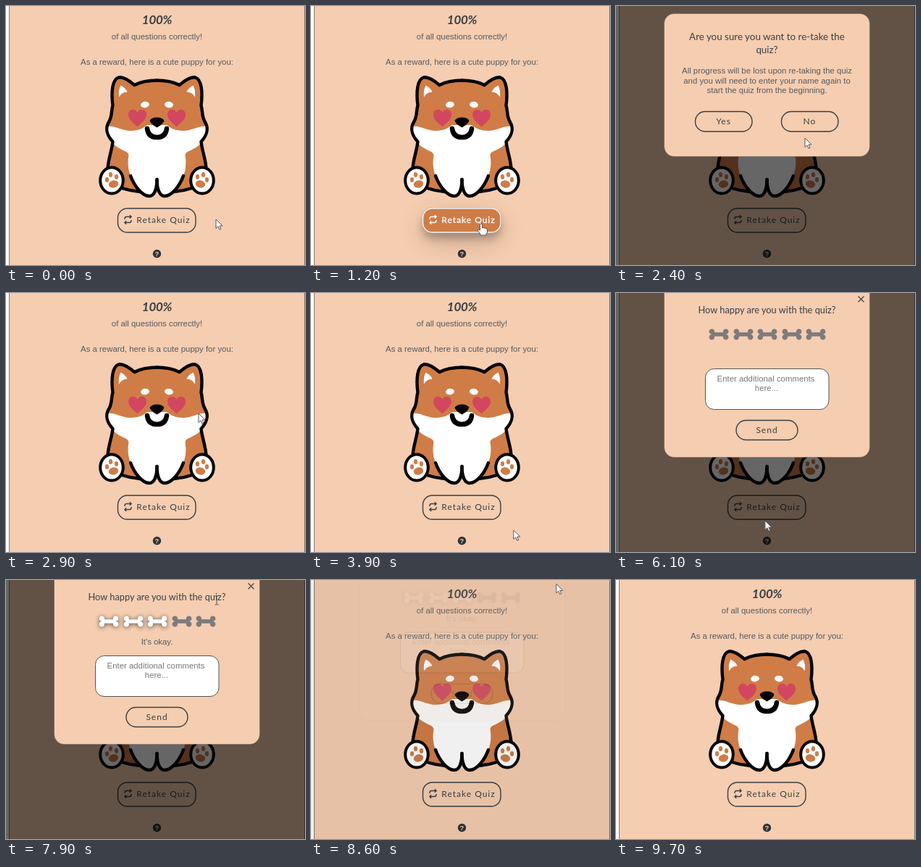
Animation, 413 px wide and 357 px high, one loop 9.8 s. Source, as an HTML page:

```html
<!DOCTYPE html>
<html lang="en">
<head>
<meta charset="utf-8">
<title>Quiz result</title>
<style>
html, body { margin: 0; width: 100%; height: 100%; overflow: hidden; background: #fff; }
svg { display: block; }
text { font: 11.4px "Liberation Sans", Arial, sans-serif; fill: #555b5f; text-anchor: middle; }
.hand { font-family: Lato, sans-serif; font-size: 13.4px; fill: #3a4043; }
.score { font-size: 17px; font-weight: 700; font-style: italic; letter-spacing: -.3px; }
.label { font-size: 12px; letter-spacing: 1px; }
.hint { fill: #777; }
.line { fill: none; stroke: #3a4043; stroke-width: 1.4; }
.hover .line { stroke: #fff; }
.hover .label { fill: #fff; stroke: #fff; stroke-width: .35px; }
.card { fill: #f5cdb0; stroke: rgba(0, 0, 0, .2); }
.ink { fill: none; stroke: #000; stroke-width: 4.4; stroke-linecap: round; stroke-linejoin: round; }
.fur { fill: #d07c46; }
.white { fill: #fff; }
.pointer { fill: #fff; stroke: #555; stroke-linejoin: round; }
</style>
</head>
<body>
<svg id="stage" width="413" height="357" viewBox="0 0 413 357">
  <defs>
    <path id="coat" class="fur" d="M209.5 102.5C196 102.5 186 104.500 177.500 109C168 101 160 97.500 155.500 98.500C147 101 145 118 147.500 137C145 145 147 152 142 160C137 168 139 178 147.500 187C146 200 141 212 140.500 224V240L160 251L185 257H209.5Z"/>
    <path id="belly" class="white" d="M140 166C150 164 160 172 172 172C184 172 190 168 195 164H210.500V250C208 258 203 262 198 262C188 262 177 248 172 234C168 224 168 214 169.500 206C169 199 160 201 147 189C142 182 139 174 140 166Z"/>
    <g id="details">
      <path class="ink" d="M209 102.5C196 102.5 186 104.500 177.500 109C168 101 160 97.500 155.500 98.500C147 101 145 118 147.500 137C145 145 147 152 142 160C137 168 139 178 147.500 187C146 200 141 212 140.500 224M160 251Q172 255 185 256"/>
      <path class="ink" d="M172 234C177 248 188 262 198 262C205 262 208.5 252 208.5 239"/>
      <path class="white" d="M158.500 109.500Q165 112.500 167.500 118.500Q160 118.500 156 125.500Q155 116 158.500 109.500Z"/>
      <ellipse class="white" cx="192" cy="136" rx="6" ry="4.2" transform="rotate(-8 192 136)"/>
      <path fill="#d2475f" d="M181.500 166.500C176 161 169 157 169 149.500C169 141.500 179 140.500 181.500 147C184 140.500 194 141.500 194 149.500C194 157 187 161 181.500 166.500Z"/>
      <ellipse cx="146" cy="240.500" rx="15.800" ry="18" fill="#fff" stroke="#000" stroke-width="4"/>
      <g class="fur">
        <ellipse cx="148.500" cy="245.500" rx="6.800" ry="5.200" transform="rotate(-12 148.500 245.500)"/>
        <ellipse cx="139.500" cy="239.500" rx="2.600" ry="3.400"/>
        <ellipse cx="144.500" cy="232.500" rx="2.600" ry="3.600"/>
        <ellipse cx="152.500" cy="235.500" rx="2.600" ry="3.400"/>
      </g>
    </g>
    <path id="bone" d="M-6 -2.800A3.800 3.800 0 1 0 -9.500 0A3.800 3.800 0 1 0 -6 2.800H6A3.800 3.800 0 1 0 9.500 0A3.800 3.800 0 1 0 6 -2.800Z"/>
    <path id="arrow" d="M164 294v-1q0-2.500 2.500-2.500h6.500m-2.200-2.300l2.300 2.300l-2.300 2.300"/>
  </defs>
  <rect class="white" width="413" height="357"/>
  <rect x="4.500" y="-1" width="408" height="360" fill="#f5cdb0" stroke="#85786f"/>
  <g id="page"></g>
  <rect id="shade" width="413" height="357"/>
  <g id="confirm"></g>
  <g id="feedback"></g>
  <g id="cursor">
    <path id="default" class="pointer" d="M0 0V12.500L3 9.800L5 14.300L7 13.400L5 9H9Z"/>
    <path id="press" class="pointer" d="M-1.500 1.200Q0 -.8 1.500 1.200V6Q3 4.800 4.200 6.200Q5.800 5.300 6.700 7Q8.500 6.700 8.500 8.500V11Q8.300 13 7 14.500V16H-1V14.500Q-3.500 11.500 -5 9Q-4.200 6.800 -1.500 9.200Z"/>
    <path id="beam" fill="none" stroke="#555" d="M-2.500 -6H-.7L0 -5.500L.7 -6H2.500M0 -5.500V5.500M-2.500 6H-.7L0 5.500L.7 6H2.500"/>
  </g>
</svg>
<script>
const $ = id => document.getElementById(id);

const LOOP = 9800;
const BONES = [142, 176, 209, 243, 276];
const MOODS = ["", "Not good.", "Not great.", "It's okay.", "It's good.", "I love it!"];
const BUTTONS = {
  retake: { x: 154.5, y: 279, w: 107.5, h: 33, r: 13, label: "Retake Quiz", tx: 217.5, ty: 299, dialog: 0 },
  yes: { x: 109.5, y: 145.5, w: 78.5, h: 27.5, r: 13.5, label: "Yes", tx: 148.5, ty: 163, dialog: 1 },
  no: { x: 228.5, y: 145.5, w: 78.5, h: 27.5, r: 13.5, label: "No", tx: 267.5, ty: 163, dialog: 1 },
  send: { x: 166, y: 175.5, w: 85, h: 27, r: 13.5, label: "Send", tx: 208.5, ty: 193, dialog: 2 }
};
// time, x, y
const PATH = [
  [0, 290, 294], [200, 290, 294], [800, 235, 300], [1800, 235, 300], [2400, 261, 182],
  [2550, 266, 166], [3100, 266, 166], [3700, 250, 318], [4000, 290, 330], [4300, 378, 330],
  [4800, 213.5, 344], [6000, 213.5, 344], [6500, 142, 60], [6950, 276, 60], [7250, 209, 60],
  [7550, 209, 60], [7900, 291, 28], [8250, 338, 9], [8500, 338, 9], [9000, 345, -25]
];

const text = (x, y, s, cls = "") => `<text x="${x}" y="${y}" class="${cls}">${s}</text>`;
const rect = (b, attrs) => `<rect x="${b.x}" y="${b.y}" width="${b.w}" height="${b.h}" rx="${b.r}" ${attrs}/>`;
const shadow = (b, dy, blur, alpha) =>
  rect({ ...b, y: b.y + dy }, `style="filter:blur(${blur}px)" opacity="${alpha}"`);
const mirrored = id => `<use href="#${id}"/><use href="#${id}" transform="translate(417) scale(-1 1)"/>`;

function button(id) {
  const b = BUTTONS[id];
  const icon = id === "retake"
    ? `<use href="#arrow" class="line"/><use href="#arrow" class="line" transform="rotate(180 168.5 294.5)"/>` : "";
  const face = rect(b, 'class="line"') + icon + text(b.tx, b.ty, b.label, "hand label");
  return `${face}<g id="${id}" class="hover">${shadow(b, 8.5, 5.7, .24)}${shadow(b, 12, 18, .19)}
    ${rect(b, 'class="fur"')}${face}</g>`;
}

const help = fill => `<circle cx="208.5" cy="341.5" r="5.7" fill="${fill}"/>
  <text x="208.5" y="345" style="font-size:9.5px;font-weight:700;fill:#f5cdb0">?</text>`;

$("page").innerHTML =
  text(208.5, 24.5, "100%", "hand score") +
  text(208.5, 46, "of all questions correctly!") +
  text(208.5, 81, "As a reward, here is a cute puppy for you:") +
  mirrored("coat") + mirrored("belly") + mirrored("details") +
  `<path d="M198.5 158Q201 153.500 208.5 153.500Q216 153.500 218.5 158Q217 163 208.5 167.500Q200 163 198.5 158Z"/>
   <path class="ink" style="stroke-width:6.5" d="M195 169C196 177.500 201 181 208.5 181C216 181 221 177.500 222 169"/>` +
  button("retake") + help("#2f3538") + `<g id="help">${help("#d07c46")}</g>`;

$("confirm").innerHTML =
  `<rect class="card" x="66.5" y="10.5" width="284" height="197" rx="14"/>` +
  text(208.5, 47, "Are you sure you want to re-take the", "hand") +
  text(208.5, 65, "quiz?", "hand") +
  text(208.5, 93, "All progress will be lost upon re-taking the quiz") +
  text(208.5, 106.5, "and you will need to enter your name again to") +
  text(208.5, 119.5, "start the quiz from the beginning.") +
  button("yes") + button("no");

$("feedback").innerHTML =
  `<rect class="card" x="66.5" y="-20" width="284" height="246.5" rx="14"/>
   <path class="line" style="stroke-width:1.1" d="M334.5 4.500l8 8m0-8l-8 8"/>
   <text x="208.5" y="28" class="hand" style="font-size:12.8px">How happy are you with the quiz?</text>` +
  BONES.map((x, i) => `<g transform="translate(${x} 57)"><use href="#bone" fill="#7d7b7b"/>
    <g id="bone${i}"><use href="#bone" y="1" style="filter:blur(3px)" opacity=".6"/><use href="#bone" fill="#fff"/></g></g>`).join("") +
  `<text id="mood" x="208.5" y="89"></text>
   <rect class="white" x="123.5" y="104.5" width="170.5" height="56" rx="12" stroke="#555"/>` +
  text(207, 121.5, "Enter additional comments", "hint") + text(208, 134.5, "here...", "hint") +
  button("send");

const ramp = (t, from, span) => Math.min(1, Math.max(0, (t - from) / span));
const smooth = k => k * k * (3 - 2 * k);
const fade = (t, open, close) => smooth(ramp(t, open, 300)) * (1 - smooth(ramp(t, close, 250)));
const dialogAt = t => t >= 1500 && t < 2580 ? 1 : t >= 5300 && t < 8400 ? 2 : 0;

function pointAt(t) {
  const i = PATH.findIndex(p => p[0] > t);
  if (i < 0) return PATH[PATH.length - 1].slice(1);
  if (i === 0) return PATH[0].slice(1);
  const [t0, x0, y0] = PATH[i - 1], [t1, x1, y1] = PATH[i];
  const k = smooth((t - t0) / (t1 - t0));
  return [x0 + (x1 - x0) * k, y0 + (y1 - y0) * k];
}

function hit(id, t) {
  const [x, y] = pointAt(t), dialog = dialogAt(t);
  if (id === "help") return !dialog && Math.hypot(x - 208.5, y - 341.5) < 6.5;
  const b = BUTTONS[id];
  return dialog === b.dialog && x > b.x && x < b.x + b.w && y > b.y && y < b.y + b.h;
}

// share of the last 200 ms spent over the control
function hoverAmount(id, t) {
  let n = 0;
  for (let i = 0; i < 10; i++) n += hit(id, t - i * 20);
  return n / 10;
}

function showDialog(id, amount) {
  $(id).setAttribute("opacity", amount);
  $(id).setAttribute("transform", `translate(0 ${-36 * (1 - amount)})`);
}

function draw(t) {
  const [x, y] = pointAt(t), dialog = dialogAt(t);
  const ids = [...Object.keys(BUTTONS), "help"];
  for (const id of ids) $(id).setAttribute("opacity", hoverAmount(id, t));

  const confirm = fade(t, 1500, 2580), feedback = fade(t, 5300, 8400);
  showDialog("confirm", confirm);
  showDialog("feedback", feedback);
  $("shade").setAttribute("opacity", .6 * Math.max(confirm, feedback));

  const onBones = dialog === 2 && y > 48 && y < 67 && x > 126 && x < 292;
  const rating = onBones ? BONES.filter(b => b - 17 < x).length : t > 7400 ? 3 : 0;
  BONES.forEach((_, i) => $("bone" + i).setAttribute("opacity", i < rating ? 1 : 0));
  $("mood").textContent = MOODS[rating];

  const onClose = dialog === 2 && Math.hypot(x - 338, y - 8) < 8;
  const onTitle = dialog === 2 && y > 15 && y < 35 && x > 115 && x < 303;
  const shape = onBones || onClose || ids.some(id => hit(id, t)) ? "press" : onTitle ? "beam" : "default";
  for (const id of ["default", "press", "beam"]) $(id).style.display = id === shape ? "" : "none";
  $("cursor").setAttribute("transform", `translate(${x} ${y})`);
}

const start = performance.now();
function tick() {
  draw((performance.now() - start) % LOOP);
  requestAnimationFrame(tick);
}
tick();
</script>
</body>
</html>
```
